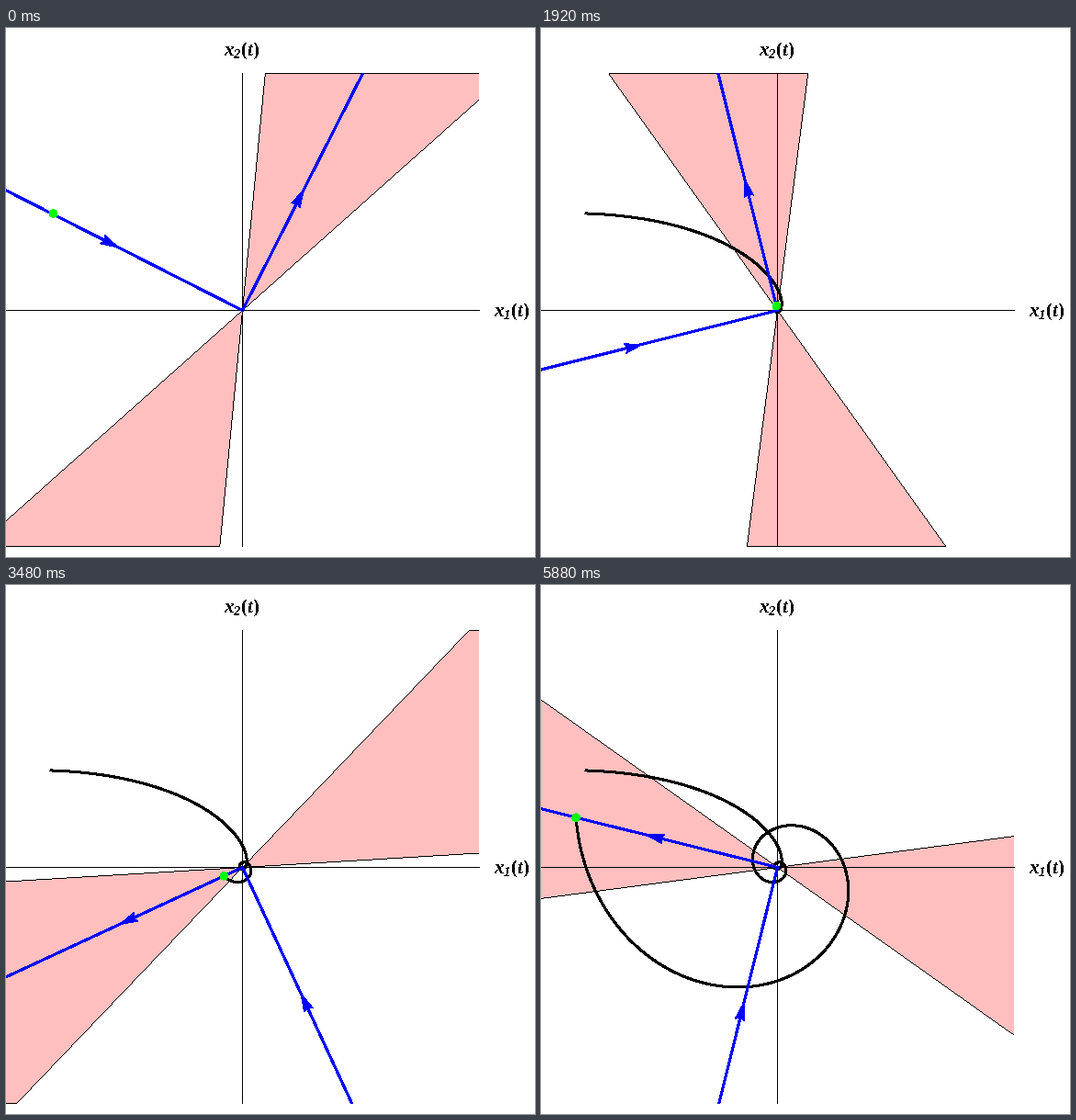
These frames come from a looping animation (576x576 px, 6240 ms). A matplotlib script:

```python
import numpy as np
import matplotlib.pyplot as plt
from matplotlib.animation import FuncAnimation
from matplotlib.patches import Circle, Polygon, Rectangle

plt.rcParams.update({
    "mathtext.fontset": "custom",
    "mathtext.rm": "Liberation Serif:bold",
    "mathtext.it": "Liberation Serif:italic:bold",
    "mathtext.bfit": "Liberation Serif:italic:bold",
    "text.antialiased": False,
})

SIZE = 576
CENTER = 257.5 + 307.5j
TOP, BOTTOM = 258, -257
STEPS, HOLD, INTERVAL = 50, 2, 120
T0, DT = 0.001, 0.058
OMEGA, GROW, DECAY = 6, 2, 13
RADIUS, SEED = 234.6, 0.00327
CONE = np.sqrt(GROW / DECAY)  # tangent of the growth cone's half angle
REACH = 400

fig = plt.figure(figsize=(SIZE / 72, SIZE / 72), dpi=72, facecolor="white")
ax = fig.add_axes([0, 0, 1, 1])
ax.set(xlim=(0, SIZE), ylim=(SIZE, 0))
ax.axis("off")
plot_box = Rectangle((0, 49), 515, 516, transform=ax.transData)


def to_pixels(z):
    """Plane points, as complex numbers, to stage pixels."""
    p = CENTER + np.conj(z)
    return np.column_stack([p.real, p.imag])


def direction(t):
    """Unit vector of the growing solution at time t."""
    return np.exp(1j * (np.arctan(2) - OMEGA * t))


def solution(t):
    return RADIUS * direction(t) * (SEED * np.exp(GROW * t)
                                    + 1j * np.exp(-DECAY * t))


def thick_line(color, z):
    # Unsmoothed strokes fill every pixel they touch, so 2 looks like 3.
    art, = ax.plot([], [], color=color, lw=2, antialiased=False,
                   solid_capstyle="butt", zorder=z)
    art.set_clip_path(plot_box)
    return art


def hairline(z):
    """A crisp one-pixel line, made of one pixel marker per step."""
    art, = ax.plot([], [], ",", color="black", antialiased=False, zorder=z)
    return art


def set_hairline(art, z):
    # Pixel markers sit half a pixel right of and above their point.
    art.set_data(*(to_pixels(z) + [-0.5, 0.5]).T)


def shape(color, z, smooth=False):
    art = Polygon(np.zeros((3, 2)), facecolor=color, lw=0,
                  antialiased=smooth, zorder=z)
    ax.add_patch(art)
    art.set_clip_path(plot_box)
    return art


cones = [shape("#ffbfbf", 1, smooth=True) for _ in range(2)]
cone_sides = [hairline(2) for _ in range(2)]
cone_ends = [hairline(2) for _ in range(2)]
set_hairline(hairline(3), np.arange(BOTTOM, TOP + 1) * 1j)
set_hairline(hairline(3), np.arange(-257, 259) + 0j)
trail = thick_line("black", 4)
rays = thick_line("blue", 5)
heads = [shape("blue", 6) for _ in range(2)]
dot = Circle((0, 0), 4.2, facecolor="lime", lw=0, antialiased=False, zorder=7)
ax.add_patch(dot)

ax.text(257, 30, r"$\mathbfit{x_2}(t)$", fontsize=21, ha="center")
ax.text(551, 314, r"$\mathbfit{x_1}(t)$", fontsize=21, ha="center")

arrow = np.array([0, -20 + 5.3j, -17.5, -20 - 5.3j])
row = np.arange(-257, 258)


def update(i):
    t = T0 + DT * min(i, STEPS - 1)
    u = direction(t)

    for sign, cone, side in zip((1, -1), cones, cone_sides):
        cone.set_xy(to_pixels(sign * 2 * REACH * u
                              * np.array([0, 1 + 1j * CONE, 1 - 1j * CONE])))
        edge = u * (1 + sign * 1j * CONE)
        set_hairline(side, row * edge / max(abs(edge.real), abs(edge.imag)))

    for height, end in zip((TOP, BOTTOM), cone_ends):
        z = row + height * 1j
        local = z / u
        set_hairline(end, z[np.abs(local.imag) <= CONE * np.abs(local.real)])

    rays.set_data(*to_pixels(REACH * u * np.array([1, 0, 1j])).T)
    heads[0].set_xy(to_pixels(u * (148 + arrow)))
    heads[1].set_xy(to_pixels(1j * u * (151 - arrow)))

    trail.set_data(*to_pixels(solution(np.linspace(0, t, 600))).T)
    dot.center = to_pixels(solution(t))[0]
    return ()


anim = FuncAnimation(fig, update, frames=STEPS + HOLD, interval=INTERVAL,
                     repeat=True, repeat_delay=0)
plt.show()
```
